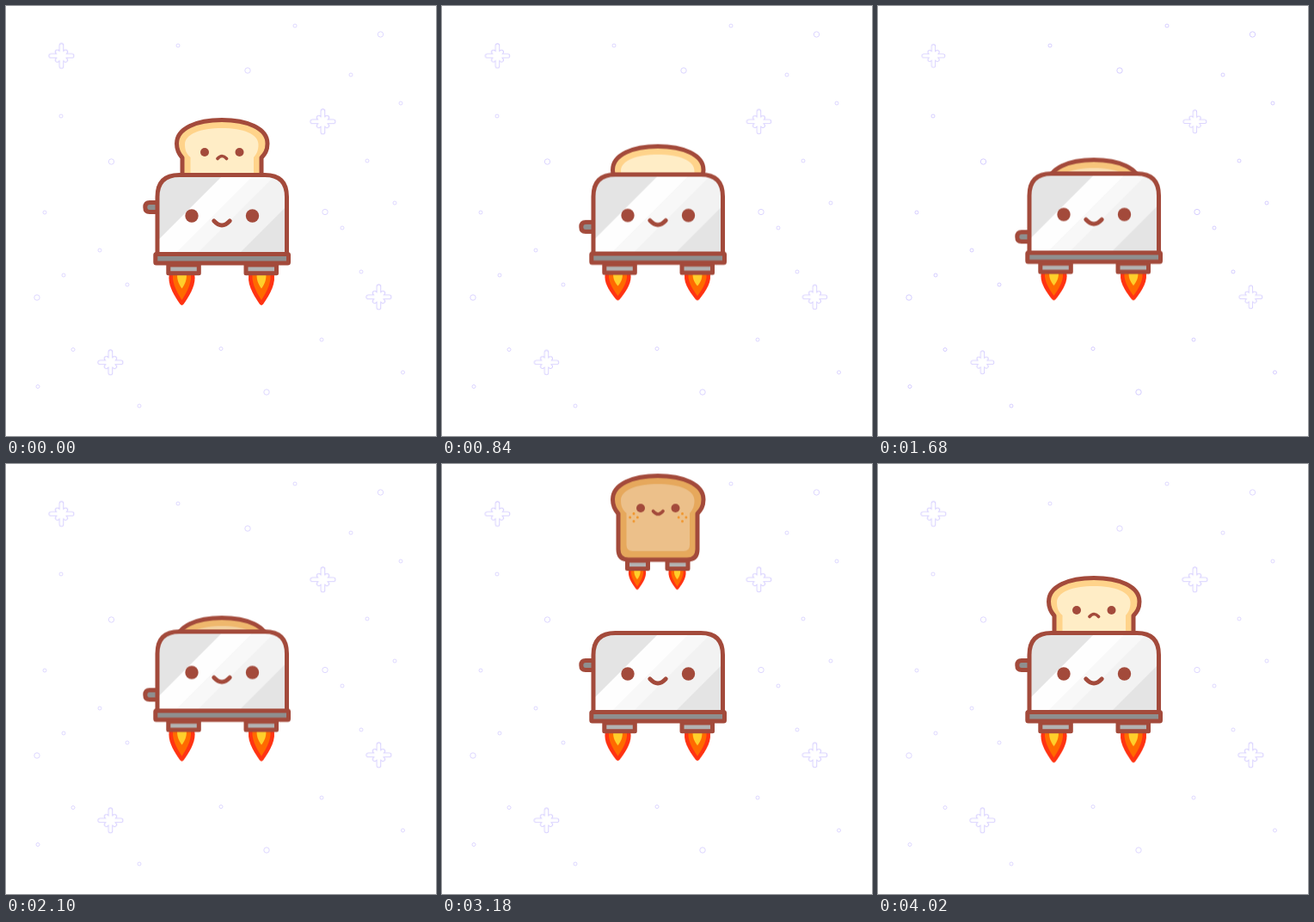
These frames come from a looping animation (500x500 px, 4.08 s). An HTML page:

```html
<!DOCTYPE html>
<html lang="en">
<head>
<meta charset="utf-8">
<title>Rocket toaster</title>
<style>
  html, body { margin: 0; width: 100%; height: 100%; overflow: hidden; background: #fff; }
  svg { display: block; width: 100vw; height: 100vh; }
  .line { stroke: #a34a3b; stroke-width: 5; stroke-linejoin: round; stroke-linecap: round; }
  .thin { stroke-width: 3.6; }
  .ink { fill: #a34a3b; }
  .open { fill: none; }

  #craft, #bread, #lever, #crust, #crumb, #sad, #happy, #boost, #glow {
    animation: 4080ms linear infinite;
  }
  #craft { animation-name: bob; }
  #bread { animation-name: bread; }
  #lever { animation-name: lever; }
  #crust { animation-name: crust; }
  #crumb { animation-name: crumb; }
  #sad { animation-name: sad; }
  #happy { animation-name: happy; }
  #boost { animation-name: boost; }
  #glow { animation-name: glow; }
  .flicker { animation: flicker 255ms ease-in-out infinite alternate; }
  .cross { animation: twinkle 510ms ease-in-out infinite alternate; }
  .dot { animation: dim 510ms ease-in-out infinite alternate; }

  @keyframes bob {
    0%, 17% { transform: translateY(0); }
    28%, 53% { transform: translateY(-1.6px); }
    62%, 100% { transform: translateY(0); }
  }
  @keyframes bread {
    0%, 17.2% { transform: translateY(130px); animation-timing-function: ease-in-out; }
    23%, 66.2% { transform: translateY(178px); animation-timing-function: ease-out; }
    70.6% { transform: translateY(62px); animation-timing-function: ease-in-out; }
    74% { transform: translateY(56px); animation-timing-function: ease-in; }
    77.94% { transform: translateY(12px); }
    83.8% { transform: translateY(-155px); animation-timing-function: step-end; }
    85.3% { transform: translateY(-110px); animation-timing-function: ease-in; }
    91% { transform: translateY(136px); animation-timing-function: ease-out; }
    93%, 100% { transform: translateY(130px); }
  }
  @keyframes lever {
    0%, 17.2% { transform: translateY(0); animation-timing-function: ease-in-out; }
    23%, 66.2% { transform: translateY(36px); animation-timing-function: ease-out; }
    68.5%, 100% { transform: translateY(0); }
  }
  @keyframes crust {
    0%, 29.4% { fill: #ffd38a; }
    64.7%, 84% { fill: #e6a85c; }
    84.1%, 100% { fill: #ffd38a; }
  }
  @keyframes crumb {
    0%, 29.4% { fill: #ffedc6; }
    64.7%, 84% { fill: #ecc08a; }
    84.1%, 100% { fill: #ffedc6; }
  }
  @keyframes sad {
    0%, 84% { opacity: 1; animation-timing-function: step-end; }
    45% { opacity: 0; animation-timing-function: step-end; }
    84%, 100% { opacity: 1; }
  }
  @keyframes happy {
    0% { opacity: 0; animation-timing-function: step-end; }
    45% { opacity: 1; animation-timing-function: step-end; }
    84%, 100% { opacity: 0; }
  }
  @keyframes boost {
    0%, 68% { transform: scaleY(0); }
    71%, 84% { transform: scaleY(1); }
    84.1%, 100% { transform: scaleY(0); }
  }
  @keyframes glow {
    0%, 56% { opacity: 0; }
    63%, 65.5% { opacity: .8; }
    68%, 100% { opacity: 0; }
  }
  @keyframes flicker { from { transform: scaleY(1); } to { transform: scaleY(.83); } }
  @keyframes twinkle { from { transform: scale(1.06); } to { transform: scale(.96); } }
  @keyframes dim { from { opacity: .75; } to { opacity: 1; } }
</style>
</head>
<body>
<svg viewBox="0 0 500 500">
  <defs>
    <clipPath id="shell"><path d="M176 289V222Q176 196.500 201.500 196.500H301Q326.500 196.500 326.500 222V289Z"/></clipPath>
    <g id="flame">
      <path fill="#ff3312" d="M-14 -2C-18 11 -10 24 -2 35.800Q0 38 2 35.800C10 24 18 11 14 -2Z"/>
      <path fill="#ff6a00" d="M-10 -2C-12.500 9 -7 20 0 31C7 20 12.500 9 10 -2Z"/>
      <path fill="#ffcf2b" d="M-5 -2C-6.500 6 -4 12 0 17.500C4 12 6.500 6 5 -2Z"/>
    </g>
    <g id="cross">
      <path id="rays" d="M0 -11.500V11.500M-11.500 0H11.500M-4.500 -4.500L4.500 4.500M-4.500 4.500L4.500 -4.500" fill="none" stroke-linecap="round"/>
    </g>
  </defs>

  <g id="stars"></g>

  <g id="craft">
    <g id="bread">
      <g transform="translate(0 112)">
        <g id="boost">
          <g class="flicker">
            <use href="#flame" transform="translate(227 0) scale(.67)"/>
            <use href="#flame" transform="translate(273.500 0) scale(.67)"/>
          </g>
        </g>
      </g>
      <g class="line" fill="#b3b3b3">
        <rect x="215.500" y="101" width="24" height="9.500"/>
        <rect x="262" y="101" width="24" height="9.500"/>
      </g>
      <path id="crust" class="line" d="M251 2.500C222 2.500 198.500 12 198.500 30C198.500 38 201 42 205 46.500V88Q205 100 217 100H285Q297 100 297 88V46.500C301 42 304 38 304 30C304 12 280 2.500 251 2.500Z"/>
      <path id="crumb" d="M251 12C226 12 208 19 208 31C208 38 210 42 214.500 46V83Q214.500 90 221.500 90H281Q288 90 288 83V46C291.500 42 293.500 38 293.500 31C293.500 19 276 12 251 12Z"/>
      <g class="ink"><circle cx="231" cy="40" r="5"/><circle cx="271.500" cy="40" r="5"/></g>
      <path id="sad" class="line thin open" d="M246 47.500Q251.200 41.500 256.500 47.500"/>
      <g id="happy">
        <path class="line thin open" d="M245.500 43.500Q251.200 50.500 257 43.500"/>
        <g fill="none" stroke="#f0962e" stroke-width="3" stroke-linecap="round" stroke-dasharray="0 6.150">
          <path d="M223 46.500L227.350 50.850L223 55.200L218.650 50.850Z"/>
          <path d="M279.500 46.500L283.850 50.850L279.500 55.200L275.150 50.850Z"/>
        </g>
      </g>
    </g>

    <g id="lever">
      <path class="line" fill="#8f8f8f" d="M178 228.500H167Q161.800 228.500 161.800 234T167 239.500H178Z"/>
    </g>

    <g transform="translate(0 311)">
      <g class="flicker">
        <use href="#flame" x="204.500"/>
        <use href="#flame" x="297"/>
      </g>
    </g>
    <g class="line" fill="#b3b3b3">
      <rect x="188.800" y="301" width="35.500" height="9.800"/>
      <rect x="279" y="301" width="35.500" height="9.800"/>
    </g>

    <g clip-path="url(#shell)">
      <rect x="170" y="190" width="162" height="104" fill="#f2f2f2"/>
      <path fill="#f8f8f8" d="M295 190H320L216 294H191Z"/>
      <path id="glow" fill="#fff" d="M259 190H369L265 294H155Z"/>
      <path fill="#fefefe" d="M259 190H295L191 294H155Z"/>
      <path fill="#e4e4e4" d="M170 190H259L155 294H170ZM369 190L265 294H340V190Z"/>
    </g>
    <path class="line open" d="M176 289V222Q176 196.500 201.500 196.500H301Q326.500 196.500 326.500 222V289Z"/>
    <rect class="line" fill="#8f8f8f" x="173.800" y="288.500" width="154.700" height="10.500" rx="1"/>
    <g class="ink"><circle cx="216" cy="244" r="7.700"/><circle cx="286.500" cy="244" r="7.700"/></g>
    <path class="line open" d="M241.800 249.800Q251 260 260.200 249.800"/>
  </g>
</svg>
<script>
  const crosses = [[64.5, 58], [368.5, 134.5], [433.500, 338.5], [121.5, 414.5]];
  const small = [
    [336, 23], [200, 46], [401, 80], [459, 113], [64, 128], [420, 180], [452, 229],
    [45, 240], [391, 258], [109, 284], [413, 309], [67, 313], [141, 324], [78, 399.5],
    [250, 398.5], [367, 388], [37, 442.5], [461.5, 426], [155, 465]
  ];
  const large = [[435.5, 33], [281, 75], [122.5, 181], [371, 239.5], [36, 339], [303, 449]];
  const edge = '#cfc6ff';

  const dot = r => ([x, y]) =>
    `<circle class="dot" cx="${x}" cy="${y}" r="${r}" fill="#fff" stroke="${edge}" stroke-width=".9"/>`;
  const cross = ([x, y]) =>
    `<g transform="translate(${x} ${y})"><g class="cross">
      <use href="#rays" stroke="${edge}" stroke-width="5.200"/>
      <use href="#rays" stroke="#fff" stroke-width="3.700"/>
    </g></g>`;

  document.getElementById('stars').innerHTML =
    [...crosses.map(cross), ...small.map(dot(2)), ...large.map(dot(3.2))].join('');
</script>
</body>
</html>
```
